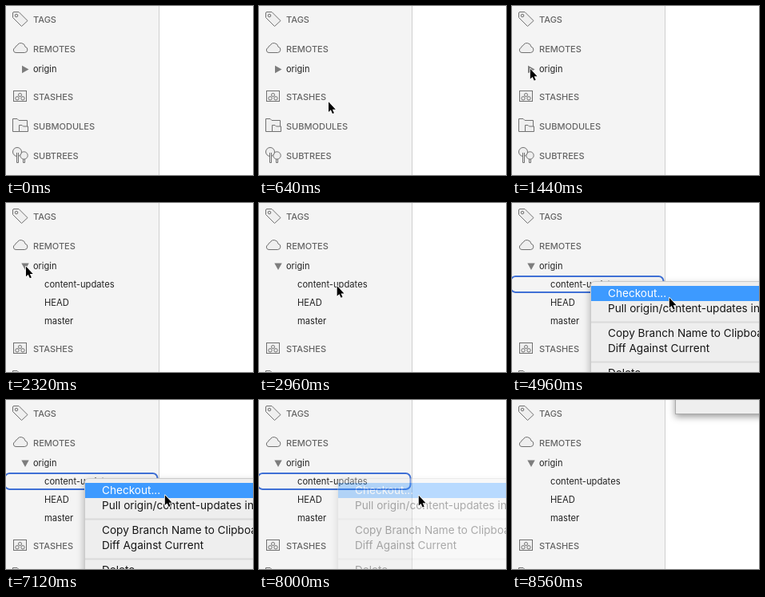
Write an HTML page that moves like this. It is 309 px wide and 212 px high and loops after 9.44 s.

```html
<!DOCTYPE html>
<html lang="en">
<head>
<meta charset="utf-8">
<title>Checkout from the sidebar</title>
<style>
  html, body { margin: 0; width: 100%; height: 100%; overflow: hidden; background: #fff; }
  svg { display: block; width: 309px; height: 212px; }
  text { font: 11px Inter, sans-serif; fill: #222; }
  #branches text { font-size: 11.2px; }
  .head text { font-weight: 500; fill: #656565; }
  .head path, .head rect, .head circle { fill: #efefef; stroke: #707070; }
  #menu { filter: drop-shadow(0 4px 5px rgba(0,0,0,.3)); }
  #menu text { font-size: 13.6px; fill: #151515; }
  #sheet { filter: drop-shadow(0 3px 4px rgba(0,0,0,.4)); }
</style>
</head>
<body>
<svg viewBox="0 0 309 212">
  <defs>
    <clipPath id="reveal"><rect id="revealBox" y="88" width="191" height="0"/></clipPath>
  </defs>

  <rect width="191" height="212" fill="#f4f4f4"/>
  <path d="M191.5 0V212" stroke="#d0d0d0"/>

  <g class="head">
    <path d="M8.5 9Q8.5 7.5 10 7.5H16L27 18.5L19.5 25.5L8.5 14.5Z"/>
    <circle cx="13" cy="12" r="1.8"/>
    <text x="34" y="21">TAGS</text>
    <path d="M13 58.5H23.3A3.7 3.7 0 0 0 24 51.2A5.3 5.3 0 0 0 14 49.5A3.3 3.3 0 0 0 11.5 52.3A3.2 3.2 0 0 0 13 58.5Z"/>
    <text x="34" y="58">REMOTES</text>
  </g>
  <path id="arrow" d="M-4-4.7L4.5 0L-4 4.7Z" fill="#7d7d7d"/>
  <text x="34" y="83">origin</text>

  <g id="branches" clip-path="url(#reveal)">
    <text x="48" y="106">content-updates</text>
    <text x="48" y="129">HEAD</text>
    <text x="48" y="152">master</text>
  </g>

  <g id="lower" class="head">
    <rect x="9.5" y="106.5" width="16" height="13"/>
    <circle cx="17.5" cy="111.5" r="2"/>
    <circle cx="14" cy="115.8" r="2.2"/>
    <circle cx="21" cy="115.8" r="2.2"/>
    <text x="34" y="118">STASHES</text>
    <path d="M8.5 157.5V141.5H14L16 143.5H26.5V157.5Z"/>
    <path d="M16.5 157.5V149.5H20L21.5 151H27.5V157.5Z"/>
    <text x="34" y="155">SUBMODULES</text>
    <path d="M21.5 189V196.5H23.5V189"/>
    <circle cx="22.5" cy="187.5" r="4.7"/>
    <circle cx="14" cy="183" r="5.5"/>
    <path d="M13.5 184V196.5H15.5V184"/>
    <text x="34" y="192">SUBTREES</text>
  </g>

  <rect id="ring" x="-1.5" y="92" width="191" height="20" rx="6" fill="none" stroke="#3f70d5" stroke-width="2"/>

  <g id="menu">
    <rect x="98.5" y="98.5" width="260" height="180" rx="5" fill="#eeeeee" stroke="#cacaca"/>
    <rect id="highlight" x="99" y="104" width="259" height="19" fill="#3d9aff"/>
    <path d="M99 149.5H358M99 199.5H358" stroke="#dadada" stroke-width="2"/>
    <text id="checkout" x="120" y="118.3">Checkout...</text>
    <text x="120" y="137">Pull origin/content-updates into master</text>
    <text x="120" y="168">Copy Branch Name to Clipboard</text>
    <text x="120" y="187">Diff Against Current</text>
    <text x="120" y="217.5">Delete...</text>
  </g>

  <g id="sheet">
    <rect x="204.5" y="-60.5" width="200" height="78" fill="#eeeeee" stroke="#a9a9a9"/>
  </g>

  <path id="cursor" d="M.8 .8V13.6L3.6 10.9L5.7 15.6L7.7 14.7L5.7 10.2H9.6Z" fill="#000"
    stroke="#fff" stroke-width="1.6" stroke-linejoin="round" paint-order="stroke"/>
</svg>

<script>
const LOOP = 9440, STEP = 80;
const el = id => document.getElementById(id);
const show = (id, on) => { el(id).style.display = on ? '' : 'none'; };
const move = (id, x, y, angle = 0) =>
  el(id).setAttribute('transform', `translate(${x} ${y}) rotate(${angle})`);
const progress = (t, from, to) => Math.min(1, Math.max(0, (t - from) / (to - from)));
const smooth = p => p * p * (3 - 2 * p);

// Each glide: start, end, destination of the pointer tip.
const start = [168, 170];
const glides = [
  [160, 1040, 24, 81],
  [1040, 1120, 22, 79],
  [1360, 1440, 22, 78],
  [2240, 3040, 99, 104],
  [4080, 4560, 192, 117],
  [4720, 4960, 196, 118],
  [7040, 7120, 198, 118.5],
  [7600, 7680, 199, 119],
  [8000, 8400, 322, 150]
];

function pointer(t) {
  let [x, y] = start;
  for (const [from, to, tx, ty] of glides) {
    const p = smooth(progress(t, from, to));
    x += (tx - x) * p;
    y += (ty - y) * p;
  }
  return [x, y];
}

function draw(t) {
  const open = smooth(progress(t, 1600, 2000));
  move('arrow', 24, 79.5, 90 * open);
  move('lower', 0, 69 * open);
  el('revealBox').setAttribute('height', 69 * open);
  el('branches').style.opacity = open;

  const fade = 1 - progress(t, 7872, 8072);
  show('menu', t >= 3600 && fade > 0);
  el('menu').style.opacity = fade;
  show('ring', t >= 3600 && t < 8160);

  const hover = t >= 4240;
  show('highlight', hover);
  el('checkout').style.fill = hover ? '#fff' : '#151515';

  const drop = smooth(progress(t, 8080, 8560));
  show('sheet', drop > 0);
  move('sheet', 0, -34 * (1 - drop));

  show('cursor', t >= 160 && t < 8400);
  move('cursor', ...pointer(t));
}

function frame() {
  const t = performance.now() % LOOP;
  draw(Math.floor(t / STEP) * STEP);
  requestAnimationFrame(frame);
}
frame();
</script>
</body>
</html>
```
